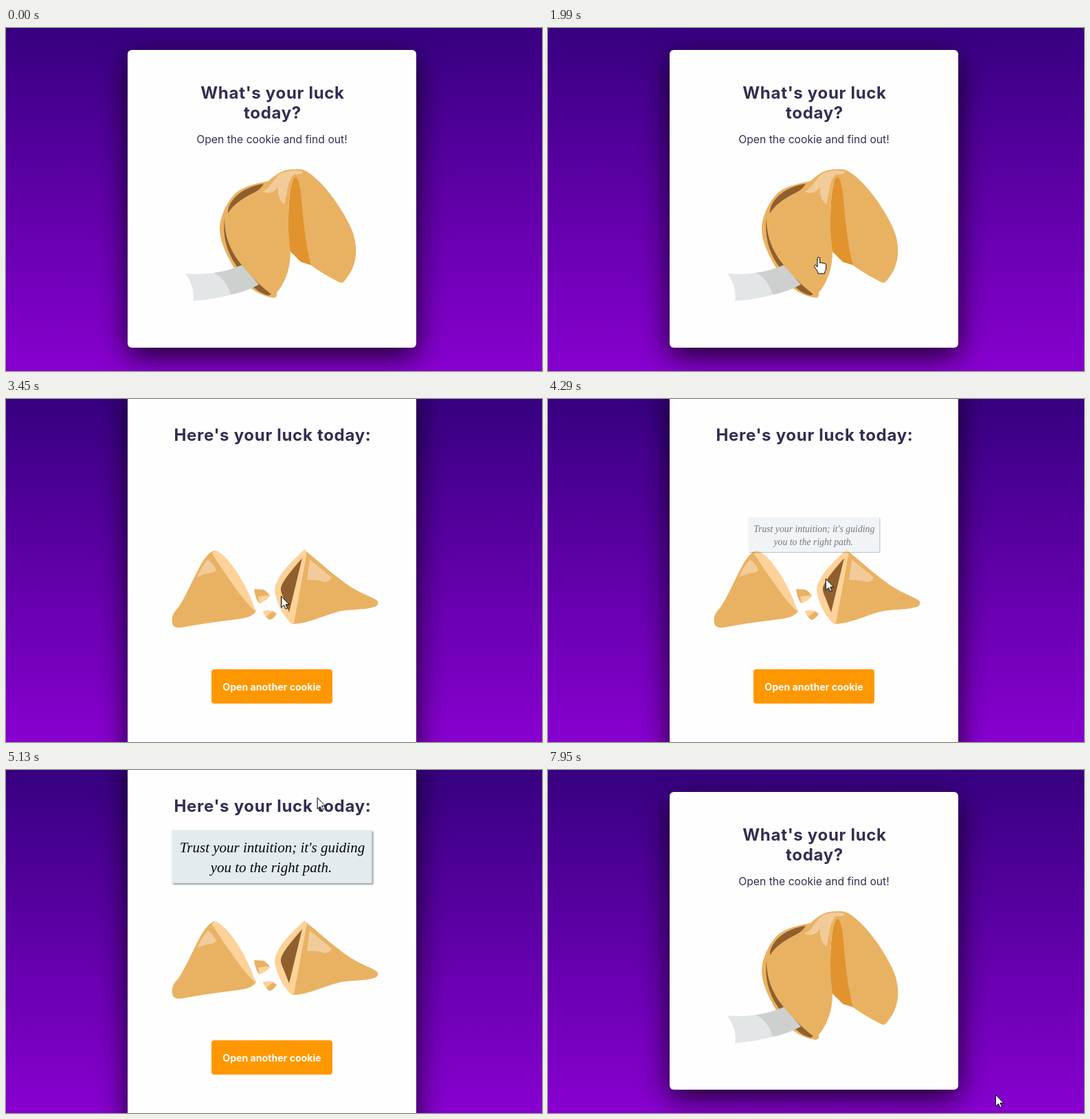
Recreate the animation shown at these times as an HTML page. Size 780 px wide and 500 px high, loop 8 s.

```html
<!DOCTYPE html>
<html lang="en">
<head>
<meta charset="utf-8">
<title>Fortune cookie</title>
<style>
  html, body { margin: 0; width: 100%; height: 100%; overflow: hidden; }
  .stage { position: relative; width: 780px; height: 500px; overflow: hidden; }
  .scene, svg { position: absolute; left: 0; top: 0; width: 780px; height: 500px; overflow: hidden; }
  .scene { background: linear-gradient(#370080, #8800d0); }
  .card {
    position: absolute; left: 177px; top: 32px; width: 420px; height: 434px;
    background: #fefefe; border-radius: 6px; box-shadow: 0 12px 40px rgba(0, 0, 0, .8);
  }
  .open .card { top: -20px; height: 560px; }

  text { font-family: Inter, sans-serif; text-anchor: middle; fill: #332d51; }
  .title { font-size: 24px; font-weight: 700; letter-spacing: .7px; }
  .sub { font-size: 15.7px; }
  .label { font-size: 14.1px; font-weight: 700; fill: #fff; }
  .fortune { font: italic 21px "Liberation Serif", serif; fill: #000; }

  .dough { fill: #e9b263; }
  .inner { fill: #e1932d; }
  .dark { fill: #8f5f2d; }
  .edge { fill: #fed299; }
  .shine { fill: #f2cb9a; }

  .open, .note, .cursor, .arrow, .hand { animation: 8s linear infinite; }
  .open { animation-name: swap; }
  .note { animation-name: rise; transform-box: fill-box; transform-origin: center; }
  .note rect { fill: #e3ebef; filter: drop-shadow(2px 2px 1px rgba(0, 0, 0, .4)); }
  .cursor { animation-name: roam; fill: #fff; stroke: #000; stroke-linejoin: round; }
  .arrow { animation-name: arrow; animation-timing-function: step-end; }
  .hand { animation-name: hand; animation-timing-function: step-end; }

  @keyframes swap {
    0%, 33.75% { opacity: 0; }
    38.875%, 84.625% { opacity: 1; }
    88.125%, 100% { opacity: 0; }
  }
  @keyframes rise {
    0%, 43.125% { transform: translateY(146px) scale(0); opacity: 0; }
    52.75% { transform: translateY(81px) scale(.61); opacity: .5; }
    58.875% { transform: translateY(45.5px) scale(.918); opacity: .73; }
    63.25% { transform: translateY(9px) scale(1); opacity: .95; }
    65%, 100% { transform: none; opacity: 1; }
  }
  @keyframes roam {
    0%, 2.375% { transform: translate(758px, 478px); }
    12% { transform: translate(433px, 254px); }
    17.5% { transform: translate(404px, 290px); }
    24.875% { transform: translate(394px, 334px); }
    32.875%, 43.125% { transform: translate(400px, 287px); }
    52.75% { transform: translate(402px, 270px); }
    58.875% { transform: translate(414px, 212px); }
    63.25% { transform: translate(446px, 50px); }
    66.75%, 74.375% { transform: translate(472px, 10px); }
    76.5% { transform: translate(560px, 70px); }
    79.5% { transform: translate(687px, 326px); }
    83%, 90.625% { transform: translate(757px, 228px); }
    95% { transform: translate(560px, 400px); }
    99.375%, 100% { transform: translate(651px, 473px); }
  }
  @keyframes arrow {
    0% { opacity: 0; }
    2.375% { opacity: 1; }
    9.75% { opacity: 0; }
    33.75%, 100% { opacity: 1; }
  }
  @keyframes hand {
    0% { opacity: 0; }
    9.75% { opacity: 1; }
    33.75%, 100% { opacity: 0; }
  }
</style>
</head>
<body>
<div class="stage">
  <div class="scene">
    <div class="card"></div>
    <svg viewBox="0 0 780 500">
      <text class="title" x="388" y="103">What's your luck</text>
      <text class="title" x="388" y="132">today?</text>
      <text class="sub" x="387" y="168">Open the cookie and find out!</text>

      <path class="inner" d="M421 214C412 224 409 270 412 324L429 341L448 347L440 225Z"/>
      <path class="dough" d="M382 223C395 212 402 206 420 206C432 205 437 208 446 215C470 234 496 274 505 299C512 320 510 340 502 355C497 363 493 369 490 371Q487 372 484 370C470 363 456 355 444 346C436 318 432 275 429 240C427 224 424 217 421 217C413 222 411 255 411 290C411 306 414 320 414 326C414 348 408 369 394 386C395 391 393 394 388 393C374 391 357 383 346 369C333 354 321 332 315 315C311 303 310 292 312 282C316 264 326 248 336 239C350 229 368 226 382 223Z"/>
      <path class="dark" d="M375 227C360 229 344 236 334 246C326 254 322 264 323 270C332 255 349 246 361 240Q372 234 375 227Z"/>
      <path class="dark" d="M318 277C315 300 320 325 335 346C348 367 364 386 382 390L386 388C366 373 347 352 335 335C322 315 318 297 318 277Z"/>
      <path class="shine" d="M373 238C383 236 388 222 398 213C408 207 424 207 431 209C433 213 428 214 420 213C410 218 410 240 405 257C398 251 395 244 396 231C391 240 381 243 373 238Z"/>
      <path fill="#cdd0cf" d="M302 357Q324 354 343 345.500L368 374Q348 385 326 389Z"/>
      <path fill="#e2e6e6" d="M261 358Q282 360 302 357C315 362 323 375 327 389Q300 396 272 398C275 385 269 368 261 358Z"/>
    </svg>
  </div>

  <div class="scene open">
    <div class="card"></div>
    <svg viewBox="0 0 780 500">
      <text class="title" x="388" y="61">Here's your luck today:</text>

      <path class="dough" d="M304 220.500C292 224 284 240 275 258C265 278 257 296 249 306C242 313 241 320 242 327Q244 335 256 333C282 328 313 324 336 321C352 319 360 316 364 309Z"/>
      <path class="edge" d="M304 220.500C322 226 350 268 363.500 310C345 295 321 257 300 226Q301 222 304 220.500Z"/>
      <path class="shine" d="M294 234Q302 240 306 249Q305 253 295 254Q287 255 278 260Q285 243 294 234Z"/>

      <path class="dough" d="M434 219.500C452 234 480 260 502 274C520 285 534 289 540 294Q544 299 537 303C520 308 504 306 488 309C462 315 440 328 416 328Z"/>
      <path class="edge" d="M434 219.500C418 235 401 251 395 265C389 275 391 283 394 292C398 306 406 319 416 328L419 327L438 223Z"/>
      <path class="dark" d="M431 232C420 245 406 260 401 272Q398 278 403 288L412 311Z"/>
      <path class="shine" d="M442 234L474 260Q471 267 464 267C456 264 448 263 438 264Q440 248 442 234Z"/>

      <path class="dough" d="M361 277L375 278Q382 282 384 288L369 298Q363 293 361 277Z"/>
      <path class="edge" d="M367 288L384 286Q383 292 369 298Z"/>
      <path class="dough" d="M374 309L388 309L394 313Q390 320 384 322Q379 321 374 309Z"/>
      <path class="edge" d="M374 309Q381 307 389 309L378 318Z"/>

      <rect x="299" y="394" width="176" height="50" rx="4" fill="#ff9800"/>
      <text class="label" x="387" y="424.500">Open another cookie</text>

      <g class="note">
        <rect x="241" y="83" width="291.500" height="77.500"/>
        <text class="fortune" x="387.5" y="116">Trust your intuition; it's guiding</text>
        <text class="fortune" x="386" y="145">you to the right path.</text>
      </g>
    </svg>
  </div>

  <svg viewBox="0 0 780 500">
    <g class="cursor">
      <path class="arrow" d="M.5 .5V17L4.500 13.500L7 19L9.500 18L7 12.500H12Z"/>
      <path class="hand" d="M-2 2A1.800 1.800 0 0 1 1.600 2V9C1.600 7.500 4.800 7.500 5 9.300C5.300 7.900 8 8.200 8 10C8.600 9 10.600 9.300 10.600 11V16C10.600 20 8.500 20 8.500 24H-1C-1 20-5 17-6.500 13.500C-7 11.500-5 11-4 12L-2 14.500Z"/>
    </g>
  </svg>
</div>
</body>
</html>
```
